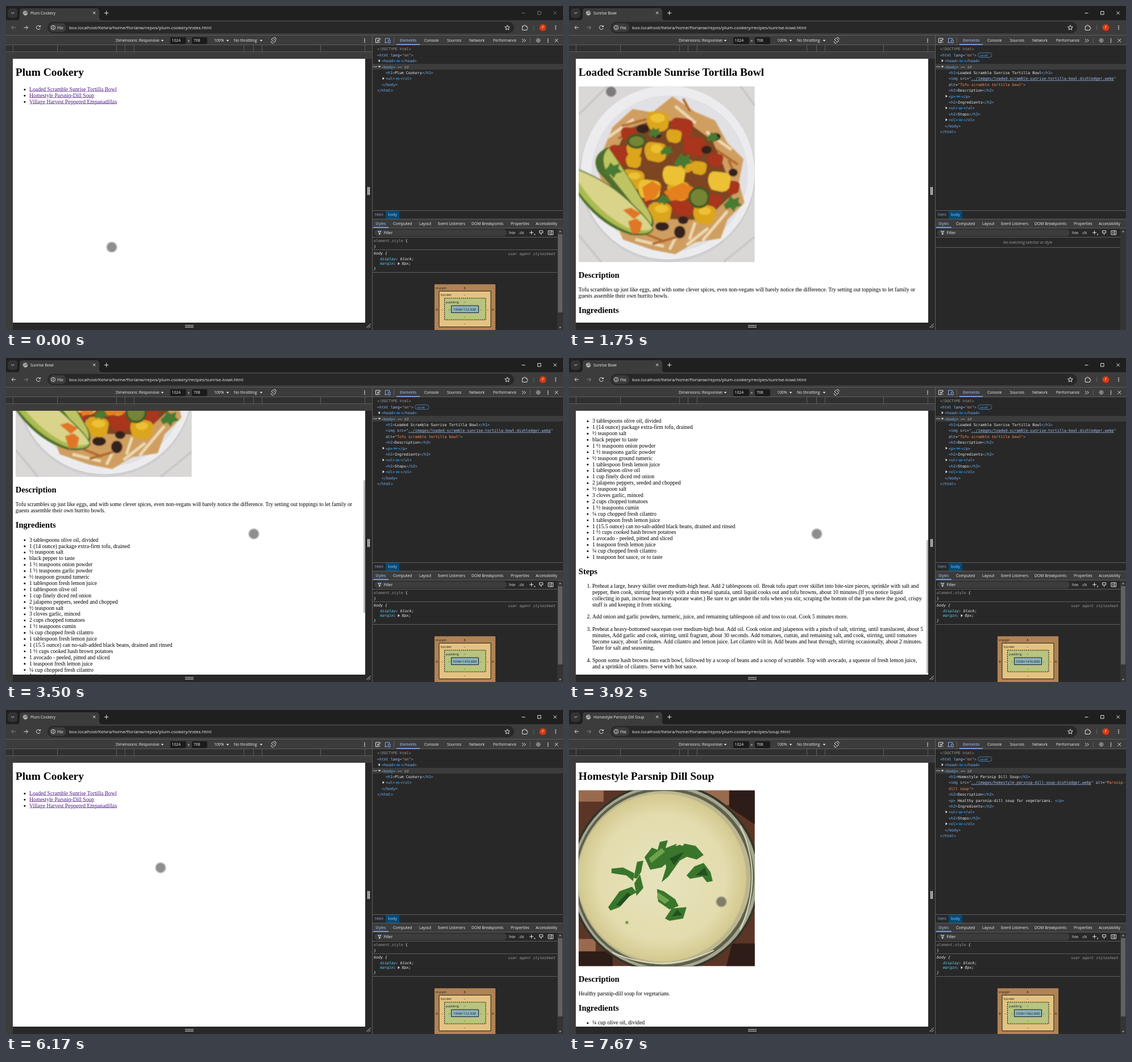
Animation, 980 px wide and 571 px high, one loop 8000 ms. Source, as an HTML page:

```html
<!DOCTYPE html>
<html lang="en">
<head>
<meta charset="utf-8">
<title>Recipe browser</title>
<style>
html, body { margin: 0; width: 100%; height: 100%; overflow: hidden; background: #282828; }
#stage { position: relative; width: 980px; height: 571px; overflow: hidden; }
#ui { position: absolute; left: 0; top: 0; font: 6.8px "Open Sans", "Noto Sans", sans-serif; fill: #efefef; }
#ui text { white-space: pre; }
.mono { font: 6.62px "DejaVu Sans Mono", "Noto Sans Mono", monospace; }
.line { fill: none; stroke: #e3e3e3; stroke-width: 1; }
.rule { fill: none; stroke: #5e5e5e; stroke-width: 1; }
.dim { opacity: .42; }
.url { font-size: 7.9px; }
.g { fill: #74b4fa; }
.n { fill: #a8c7fa; }
.v { fill: #fe8d59; }
.k { fill: #5cd5fb; }
.q { fill: #9b9b9b; }
.i { font-style: italic; }
.u { text-decoration: underline; }
.mid { text-anchor: middle; }
.box { font-size: 6px; fill: #222; }

#view { position: absolute; left: 12px; top: 93px; width: 620px; height: 465px; overflow: hidden; background: #fff; }
.roll { position: absolute; left: 0; top: 0; }
.doc { width: 1024px; padding: 0 8px; box-sizing: border-box; display: flow-root; transform: scale(.6055);
  transform-origin: 0 0; color: #000; font: 16px/18px "Liberation Serif", "Noto Serif", serif; }
.doc h1 { font-size: 32px; line-height: 37px; margin: 21.44px 0; }
.doc h2 { font-size: 24px; line-height: 27px; margin: 19.92px 0; }
.doc p, .doc ul, .doc ol { margin: 16px 0; }
.doc ul, .doc ol { padding-left: 40px; }
.doc ol li + li { margin-top: 18px; }
.doc a { color: #551a8b; text-decoration: underline; }
.pic { height: 516px; }
.pic svg { display: block; width: 512px; height: 512px; }
#thumb { position: absolute; left: 617px; top: 2px; width: 3px; height: 234px; border-radius: 1px; background: #b9b9b9; }
#dot { position: absolute; left: -10px; top: -10px; width: 16px; height: 16px; border-radius: 50%;
  border: 2px solid rgba(90, 90, 90, .34); background: rgba(40, 40, 40, .52); background-clip: padding-box; }

.a, .b, .c, .match, .none, .win { animation: a 8s step-end infinite; }
.b { animation-name: b; }
.c { animation-name: c; }
.match { animation-name: match; }
.none { animation-name: none-found; }
.win { animation-name: focus; }
#dot { animation: move 8s linear infinite; }
#bowl { animation: b 8s step-end infinite, scroll 8s linear infinite; }
#thumb { animation: thumb 8s linear infinite, fade 8s linear infinite; }

@keyframes a { 0% { visibility: visible } 20.85% { visibility: hidden } 66.6% { visibility: visible } 89.6%, 100% { visibility: hidden } }
@keyframes b { 0% { visibility: hidden } 20.85% { visibility: visible } 66.6%, 100% { visibility: hidden } }
@keyframes c { 0% { visibility: hidden } 89.6%, 100% { visibility: visible } }
@keyframes match { 0% { opacity: 1 } 20.85% { opacity: 0 } 24% { opacity: 1 } 66.6% { opacity: 0 } 69.7% { opacity: 1 } 89.6% { opacity: 0 } 92.7%, 100% { opacity: 1 } }
@keyframes none-found { 0% { opacity: 0 } 20.85% { opacity: 1 } 24% { opacity: 0 } 66.6% { opacity: 1 } 69.7% { opacity: 0 } 89.6% { opacity: 1 } 92.7%, 100% { opacity: 0 } }
@keyframes focus { 0% { opacity: .42 } 9.4%, 100% { opacity: 1 } }
@keyframes scroll {
  0%, 39.5% { transform: translateY(0) }
  39.625% { transform: translateY(-5.5px) }
  43.75% { transform: translateY(-241px) }
  46.9% { transform: translateY(-408px) }
  49%, 100% { transform: translateY(-451px) }
}
@keyframes thumb {
  0%, 39.5% { transform: translateY(0) }
  39.625% { transform: translateY(1px) }
  43.75% { transform: translateY(120px) }
  46.9% { transform: translateY(204px) }
  49%, 100% { transform: translateY(226px) }
}
@keyframes fade { 0%, 39.5% { opacity: 0 } 39.6%, 53% { opacity: 1 } 56%, 100% { opacity: 0 } }
@keyframes move {
  0%, .95% { transform: translate(186px, 425px) }
  1% { transform: translate(201px, 378px) }
  2.125%, 3.6% { transform: translate(218px, 326px); animation-timing-function: ease-in-out }
  13.5% { transform: translate(85px, 162px) }
  14.6%, 17.6% { transform: translate(79px, 154px) }
  18.75%, 23.9% { transform: translate(74px, 151px) }
  25% { transform: translate(42px, 186px) }
  26% { transform: translate(38px, 222px) }
  27.1% { transform: translate(80px, 275px) }
  28.1% { transform: translate(200px, 312px) }
  29.1% { transform: translate(345px, 314px) }
  30.25%, 39.7% { transform: translate(436px, 306px) }
  41%, 53% { transform: translate(436px, 310px); animation-timing-function: ease-in-out }
  62.5% { transform: translate(42px, 47px) }
  64.6%, 67.5% { transform: translate(13px, 38px); animation-timing-function: ease-in-out }
  72.9%, 73.9% { transform: translate(277px, 284px) }
  74%, 77% { transform: translate(277px, 280px) }
  77.125% { transform: translate(272px, 278px); animation-timing-function: ease-in-out }
  85.375%, 90.5% { transform: translate(119px, 163px); animation-timing-function: ease-in-out }
  95.8%, 100% { transform: translate(268px, 338px) }
}
</style>
</head>
<body>
<div id="stage">
<svg id="ui" width="980" height="571" viewBox="0 0 980 571">
  <defs>
    <path id="down" d="M-2.4-1.2h4.8L0 1.6z"/>
    <path id="right" d="M-1.4-2.4v4.8L1.8 0z"/>
    <g id="more"><rect width="8.4" height="5" rx="2.5" fill="#0b4a78"/><path d="M1.7 2.5h1M3.7 2.5h1M5.7 2.5h1" stroke="#a8c7fa"/></g>
    <g id="kebab"><circle cy="-2.8" r=".9"/><circle r=".9"/><circle cy="2.8" r=".9"/></g>
    <path id="arrow" class="line" d="M3.6 0h-7M-.4-3.2L-3.6 0l3.2 3.2"/>
  </defs>

  <!-- browser frame -->
  <path fill="#1f1f1f" d="M0 0h980v26H0z"/>
  <path fill="#3c3c3c" d="M0 25h980v27H0zM19 25q5 0 5-5V9q0-5 5-5h130q5 0 5 5v11q0 5 5 5z"/>
  <rect x="3" y="4" width="17" height="17" rx="5" fill="#333"/>
  <path class="line" d="M9.3 11l2.5 2.5 2.5-2.5M153 10l4.400 4.400M157.400 10L153 14.400M173 12.300h7.400M176.700 8.600V16"/>
  <circle cx="34" cy="12.400" r="4.200" fill="#c7c7c7"/>
  <path d="M31 11q3-3 4 0t-2 2-1 2M35 9q2 1 2.500 3l-2 2" fill="none" stroke="#4a4a4a"/>
  <text class="a" x="43" y="15">Plum Cookery</text>
  <text class="b" x="43" y="15">Sunrise Bowl</text>
  <text class="c" x="43" y="15">Homestyle Parsnip Dill Soup</text>
  <path class="line win" d="M907.500 12.500h6M935.500 9.500h5.500v5.500h-5.500zM963.300 9.500l5.500 5.500M968.800 9.500l-5.500 5.500"/>
  <g class="a"><use href="#arrow" class="dim" x="13.500" y="38"/><use href="#arrow" transform="translate(35 38) scale(-1 1)"/></g>
  <g class="b"><use href="#arrow" x="13.500" y="38"/><use href="#arrow" class="dim" transform="translate(35 38) scale(-1 1)"/></g>
  <g class="c"><use href="#arrow" x="13.500" y="38"/><use href="#arrow" class="dim" transform="translate(35 38) scale(-1 1)"/></g>
  <path class="line" d="M60 36.200a3.500 3.500 0 1 0 .3 2.800M60.400 34v2.600h-2.600"/>
  <rect x="73" y="28" width="821" height="20" rx="10" fill="#282828"/>
  <rect x="76" y="30.500" width="30" height="15" rx="7.500" fill="#3c3c3c"/>
  <circle class="line" cx="83" cy="38" r="3.600"/><path class="line" d="M83 37.500v2.500M83 35.600v1"/>
  <text x="90" y="40.500">File</text>
  <g class="url">
    <text class="a" x="111" y="41">box.localhost/Kelvra/home/florianw/repos/plum-cookery/index.html</text>
    <text class="b" x="111" y="41">box.localhost/Kelvra/home/florianw/repos/plum-cookery/recipes/sunrise-bowl.html</text>
    <text class="c" x="111" y="41">box.localhost/Kelvra/home/florianw/repos/plum-cookery/recipes/soup.html</text>
  </g>
  <path class="line" d="M882 33.800l1.200 2.900 3.100.2-2.400 2 .8 3.100-2.700-1.700-2.700 1.700.8-3.100-2.400-2 3.100-.2z"/>
  <path class="line" d="M908.500 35.500h2.500q0-2 1.500-2t1.500 2h2.500v2.500q1.500 0 1.500 1.200T916.500 41v1.500h-8z"/>
  <path class="rule" d="M928.500 33.500v9"/>
  <circle cx="944.500" cy="38" r="6" fill="#d93a12"/><text class="mid" x="944.500" y="40.300" font-size="6.200">F</text>
  <use href="#kebab" x="967" y="38"/>

  <!-- device mode -->
  <path fill="#3c3c3c" d="M0 52h980v17H0zM0 69h645v502H0z"/>
  <path fill="#303030" d="M0 69h644v11H0z"/>
  <path fill="#282828" d="M632 93h12v478h-12zM12 558h620v13H12z"/>
  <path class="rule" d="M0 51.500h980M0 68.500h980M0 80.500h644M12.500 69v11M90.500 69v11M194.500 69v11M209.500 69v11M225.500 69v11M418.500 69v11M435.500 69v11M450.500 69v11M553.500 69v11M631.500 69v11"/>
  <text x="193" y="63.300">Dimensions: Responsive</text><use href="#down" x="275" y="61"/>
  <rect x="289" y="55" width="28" height="12" rx="2" fill="#1b1b1b"/><text x="291.500" y="63.300">1024</text>
  <text x="319.500" y="63.500">×</text>
  <rect x="327" y="55" width="27" height="12" rx="2" fill="#1b1b1b"/><text x="330" y="63.300">768</text>
  <text x="366" y="63.300">100%</text><use href="#down" x="390" y="61"/>
  <text x="401" y="63.300">No throttling</text><use href="#down" x="449" y="61"/>
  <path class="line" d="M467 59l2.700-2.700 5 5-2.700 2.700zM466 62q.5 4 4.500 4M475.500 59q-.5-3.500-4-4"/>
  <use href="#kebab" x="631" y="61"/>
  <path class="line" d="M315 563h15M315 566h15M634.500 567l7-7M638 567.500l3.500-3.500"/>
  <path class="line" style="stroke-width:1.500" d="M636.700 319v14M639.300 319v14"/>

  <!-- developer panel -->
  <path fill="#282828" d="M645 69h335v502H645z"/>
  <path class="rule" d="M644.500 52v519"/>
  <path class="line" d="M656 64.500h-5.500v-7.500h7.500v3M654 60l4.500 4.500M654 63.500V60h3.500"/>
  <path class="line" style="stroke:#7cacf8" d="M667.500 64v-7h7v2M666 64.500h5M672.500 60h3.500v5h-3.500z"/>
  <path class="rule" d="M682.500 56v10"/>
  <text x="693" y="63.300" fill="#a8c7fa">Elements</text><path fill="#7cacf8" d="M687 67h41v1.500h-41z"/>
  <text x="736" y="63.300">Console</text><text x="776" y="63.300">Sources</text>
  <text x="815" y="63.300">Network</text><text x="857" y="63.300">Performance</text>
  <path class="line" d="M908 58l2.800 2.800-2.800 2.800M911.500 58l2.800 2.800-2.800 2.800M965.500 57.800l5.800 5.800M971.300 57.800l-5.800 5.800"/>
  <path class="rule" d="M922.500 56v10"/>
  <circle class="line" cx="936.500" cy="60.700" r="3.400" stroke-dasharray="1.800 .8"/><circle class="line" cx="936.500" cy="60.700" r="1.600"/>
  <use href="#kebab" x="953.500" y="61"/>

  <path fill="#3c3c3c" d="M645 102h335v10H645z"/>
  <g id="tree" class="mono"></g>

  <path fill="#004a77" d="M668 361h24v14h-24z"/>
  <text x="649" y="370" fill="#7cacf8">html</text><text x="672" y="370" fill="#a8c7fa">body</text>
  <path fill="#3c3c3c" d="M645 375h335v16H645z"/>
  <text x="650" y="385.700" fill="#a8c7fa">Styles</text><path fill="#7cacf8" d="M646 389.500h27v1.500h-27z"/>
  <text x="681" y="385.700">Computed</text><text x="727" y="385.700">Layout</text>
  <text x="760" y="385.700">Event Listeners</text><text x="819" y="385.700">DOM Breakpoints</text>
  <text x="888" y="385.700">Properties</text><text x="932" y="385.700">Accessibility</text>
  <path class="rule" d="M645 360.500h335M645 375.500h335M645 391.500h335M645 407.500h325"/>
  <rect x="648" y="393.500" width="233" height="12" rx="6" fill="#3c3c3c"/>
  <path class="line" d="M654.500 397h5.500l-2 2.500v3h-1.500v-3z"/><text x="664.500" y="402">Filter</text>
  <text x="884" y="401.500" font-size="6.200">:hov</text><text x="902" y="401.500" font-size="6.200">.cls</text>
  <path class="line" d="M921 399.300h7M924.500 395.800v7M938.500 396h6v4h-6zM941.500 400v3.500M954 396h8.500v7H954zM959.500 396v7M958 397.800l-2 1.700 2 1.700"/>
  <path d="M931 401v2.500h-2.500z"/>
  <path fill="#343434" d="M970 392h10v179h-10z"/>
  <path fill="#999" d="M972.800 398.500h4.400l-2.200-3z"/>

  <g class="none">
    <text class="i mid q" x="807" y="419.300">No matching selector or style</text>
    <path class="rule" d="M645 425.500h325"/>
  </g>
  <g class="match">
    <path fill="#616161" d="M971 402h8v138h-8z"/><path fill="#999" d="M972.800 565.500h4.400l-2.200 3z"/>
    <path class="rule" d="M645 429.500h325M645 469.500h325"/>
    <g class="mono">
      <text x="647" y="415.700"><tspan class="q">element.style</tspan> {</text><text x="647" y="425.500">}</text>
      <g class="i">
        <text x="647" y="438.300">body {</text>
        <text x="658" y="447.500"><tspan class="k">display</tspan>: block;</text>
        <text x="658" y="456.300"><tspan class="k">margin</tspan>:</text><text x="696.500" y="456.300">8px;</text>
        <text x="647" y="464.800">}</text>
        <text class="q" x="967" y="439.300" text-anchor="end">user agent stylesheet</text>
      </g>
      <use href="#right" x="691" y="454"/>
    </g>
    <g stroke="#1d1d1d" stroke-width="1">
      <path fill="#b08354" stroke-dasharray="2.400 1.200" d="M753.500 490h108v90h-108z"/>
      <path fill="#e3c381" d="M762 502.500h91v63h-91z"/>
      <path fill="#b8c480" stroke-dasharray="2.400 1.200" d="M771.500 515h72.500v38h-72.500z"/>
      <path fill="#88b2bd" d="M783.500 528h48v12.500h-48z"/>
    </g>
    <g class="box">
      <text x="756" y="498.500">margin</text><text x="765" y="511">border</text><text x="774" y="523.800">padding</text>
      <g class="mid">
        <text x="807" y="498.500">8</text><text x="807" y="511">–</text><text x="807" y="523.800">–</text>
        <text x="807" y="549.500">–</text><text x="807" y="562.200">–</text><text x="807" y="575">8</text>
        <text x="758" y="536.800">8</text><text x="767.500" y="536.800">–</text><text x="779.500" y="536.800">–</text>
        <text x="835.500" y="536.800">–</text><text x="847.500" y="536.800">–</text><text x="856.500" y="536.800">8</text>
        <text class="a" x="807" y="536.800">1008×112.438</text>
        <text class="b" x="807" y="536.800">1008×1476.880</text>
        <text class="c" x="807" y="536.800">1008×1062.880</text>
      </g>
    </g>
  </g>
</svg>

<div id="view">
  <div class="roll a"><div class="doc">
    <h1>Plum Cookery</h1>
    <ul>
      <li><a>Loaded Scramble Sunrise Tortilla Bowl</a></li>
      <li><a>Homestyle Parsnip-Dill Soup</a></li>
      <li><a>Village Harvest Peppered Empanadillas</a></li>
    </ul>
  </div></div>

  <div class="roll" id="bowl"><div class="doc">
    <h1>Loaded Scramble Sunrise Tortilla Bowl</h1>
    <div class="pic"><svg viewBox="0 0 310 310">
      <defs>
        <path id="cube" d="M-20-6Q-18-18-9-18L8-16Q20-14 20-5L17 11Q12 18 3 18L-14 14Q-21 4-20-6z"/>
        <use id="chip" href="#cube" transform="scale(.68)"/>
        <path id="leaf" d="M-16 2L-8-6-4-14 2-8 12-12 10-3 17 3 6 6 2 14-4 7-12 10z"/>
        <use id="sprig" href="#leaf" transform="scale(.7)"/>
        <filter id="soft"><feGaussianBlur stdDeviation="1.300"/></filter>
      </defs>
      <path fill="#dad8d7" d="M0 0h310v310H0z"/>
      <path fill="none" stroke="#c4c2c2" stroke-width="3" filter="url(#soft)" d="M0 50L50 0M0 262l40 48M255 310l55-45M285 0l25 34"/>
      <circle cx="157" cy="155" r="155" fill="#cfcfd2"/>
      <circle cx="157" cy="152" r="153" fill="#ececee"/>
      <circle cx="160" cy="154" r="138" fill="#e1e1e5"/>
      <g filter="url(#soft)">
        <path fill="#cf9e60" d="M60 72L95 40 130 46 165 18 205 45 240 60 262 100 290 128 282 170 292 205 262 235 250 268 205 275 170 296 130 288 78 270 50 200 32 140z"/>
        <path fill="none" stroke="#ecd9b2" stroke-width="5" d="M52 90l45-32M170 35l36 30M225 80l44 32M262 220l-44 52M100 270l50 12M190 280l38-30M160 288l16-32M205 240l-10 30"/>
        <path fill="none" stroke="#b0682c" stroke-width="4" d="M76 70l44-12M242 112l38 26M130 278l42-12M184 22l12 22M70 92l22-10M264 130l10 24M112 258l40 16"/>
        <path fill="#7d4423" d="M84 76L130 60 190 62 235 95 255 140 272 190 222 236 160 234 120 205 68 165 64 120z"/>
        <g fill="#a8341e">
          <use href="#cube" x="182" y="73"/><use href="#cube" x="72" y="121"/><use href="#chip" x="88" y="84"/>
          <use href="#cube" x="204" y="106"/><use href="#chip" x="241" y="130"/><use href="#cube" x="184" y="212"/>
          <use href="#chip" x="270" y="178"/><use href="#chip" x="238" y="202"/><use href="#chip" x="112" y="205"/>
        </g>
        <g fill="#35201f">
          <ellipse cx="113" cy="75" rx="11" ry="8"/><ellipse cx="241" cy="89" rx="9" ry="7"/><ellipse cx="178" cy="257" rx="10" ry="11"/>
          <ellipse cx="147" cy="247" rx="12" ry="8"/><ellipse cx="225" cy="112" rx="9" ry="7"/><ellipse cx="184" cy="236" rx="9" ry="7"/>
          <ellipse cx="272" cy="152" rx="8" ry="7"/><ellipse cx="138" cy="86" rx="8" ry="6"/>
        </g>
        <g fill="#dba51d">
          <use href="#cube" x="140" y="62"/><use href="#chip" x="168" y="88"/><use href="#chip" x="97" y="132"/><use href="#chip" x="98" y="112"/>
          <use href="#cube" x="136" y="116"/><use href="#cube" x="96" y="164"/><use href="#cube" x="176" y="184"/>
          <use href="#cube" x="144" y="222"/><use href="#cube" x="222" y="226"/><use href="#chip" x="212" y="144"/><use href="#chip" x="188" y="140"/>
        </g>
        <g fill="#ecc136">
          <use href="#cube" x="248" y="168"/><use href="#cube" x="168" y="158"/><use href="#cube" x="125" y="182"/>
          <ellipse cx="139" cy="56" rx="13" ry="8"/><ellipse cx="137" cy="110" rx="10" ry="8"/><ellipse cx="146" cy="216" rx="12" ry="7"/>
          <ellipse cx="98" cy="158" rx="11" ry="6"/><ellipse cx="222" cy="220" rx="11" ry="7"/>
        </g>
        <path fill="#e5801d" d="M112 178l18-11 16 10-10 20-19 6zM150 186l32-16 20 8-12 20-28 4z"/>
        <g fill="#748436" stroke="#3f5722" stroke-width="4"><ellipse cx="102" cy="97" rx="15" ry="11"/><circle cx="212" cy="196" r="17"/></g>
        <g fill="#467a30">
          <use href="#leaf" x="184" y="132"/><use href="#leaf" x="271" y="207"/><use href="#sprig" x="150" y="200"/>
          <use href="#sprig" x="134" y="82"/><use href="#sprig" x="236" y="90"/><use href="#sprig" x="155" y="114"/>
        </g>
        <path fill="#4d6e2d" d="M52 107Q20 122 34 150L126 252Q140 242 122 216 88 156 52 107z"/>
        <path fill="#bfc463" d="M53 109Q38 122 48 148L126 246Q134 236 119 214 86 156 53 109z"/>
        <path fill="#4d6e2d" d="M0 146Q56 168 98 210 126 236 132 252 126 266 92 262 38 246 0 192z"/>
        <path fill="#d9d48a" d="M0 148Q56 170 97 212 124 237 130 251 112 259 84 250 34 228 0 174z"/>
        <path fill="#aabb50" d="M0 168Q34 222 84 248 112 258 130 251 124 263 93 258 40 240 0 186z"/>
        <use href="#leaf" x="60" y="148" fill="#467a30"/>
        <path fill="#df7726" d="M78 218l14-4 18 10-13 10zM87 238l15-5 10 8-4 17-14 2z"/>
      </g>
    </svg></div>
    <h2>Description</h2>
    <p>Tofu scrambles up just like eggs, and with some clever spices, even non-vegans will barely notice the difference. Try setting out toppings to let family or guests assemble their own burrito bowls.</p>
    <h2>Ingredients</h2>
    <ul>
      <li>3 tablespoons olive oil, divided</li>
      <li>1 (14 ounce) package extra-firm tofu, drained</li>
      <li>½ teaspoon salt</li>
      <li>black pepper to taste</li>
      <li>1 ½ teaspoons onion powder</li>
      <li>1 ½ teaspoons garlic powder</li>
      <li>½ teaspoon ground tumeric</li>
      <li>1 tablespoon fresh lemon juice</li>
      <li>1 tablespoon olive oil</li>
      <li>1 cup finely diced red onion</li>
      <li>2 jalapeno peppers, seeded and chopped</li>
      <li>½ teaspoon salt</li>
      <li>3 cloves garlic, minced</li>
      <li>2 cups chopped tomatoes</li>
      <li>1 ½ teaspoons cumin</li>
      <li>¼ cup chopped fresh cilantro</li>
      <li>1 tablespoon fresh lemon juice</li>
      <li>1 (15.5 ounce) can no-salt-added black beans, drained and rinsed</li>
      <li>1 ½ cups cooked hash brown potatoes</li>
      <li>1 avocado - peeled, pitted and sliced</li>
      <li>1 teaspoon fresh lemon juice</li>
      <li>¼ cup chopped fresh cilantro</li>
      <li>1 teaspoon hot sauce, or to taste</li>
    </ul>
    <h2>Steps</h2>
    <ol>
      <li>Preheat a large, heavy skillet over medium-high heat. Add 2 tablespoons oil. Break tofu apart over skillet into bite-size pieces, sprinkle with salt and pepper, then cook, stirring frequently with a thin metal spatula, until liquid cooks out and tofu browns, about 10 minutes.(If you notice liquid collecting in pan, increase heat to evaporate water.) Be sure to get under the tofu when you stir, scraping the bottom of the pan where the good, crispy stuff is and keeping it from sticking.</li>
      <li>Add onion and garlic powders, turmeric, juice, and remaining tablespoon oil and toss to coat. Cook 5 minutes more.</li>
      <li>Preheat a heavy-bottomed saucepan over medium-high heat. Add oil. Cook onion and jalapenos with a pinch of salt, stirring, until translucent, about 5 minutes, Add garlic and cook, stirring, until fragrant, about 30 seconds. Add tomatoes, cumin, and remaining salt, and cook, stirring, until tomatoes become saucy, about 5 minutes. Add cilantro and lemon juice. Let cilantro wilt in. Add beans and heat through, stirring occasionally, about 2 minutes. Taste for salt and seasoning.</li>
      <li>Spoon some hash browns into each bowl, followed by a scoop of beans and a scoop of scramble. Top with avocado, a squeeze of fresh lemon juice, and a sprinkle of cilantro. Serve with hot sauce.</li>
    </ol>
  </div></div>

  <div class="roll c"><div class="doc">
    <h1>Homestyle Parsnip Dill Soup</h1>
    <div class="pic"><svg viewBox="0 0 310 310">
      <defs><radialGradient id="cream"><stop offset="0" stop-color="#e6e3bd"/><stop offset=".75" stop-color="#e3dcae"/><stop offset="1" stop-color="#d3c98f"/></radialGradient></defs>
      <path fill="#5b3526" d="M0 0h310v310H0z"/>
      <path fill="#9a6a4e" d="M0 0h44v20H0zM215 0h50v26h-50zM0 262h30v22H0z"/>
      <path fill="#2d1c17" d="M265 0h45v60l-45-30zM270 270h40v40h-50zM0 284h60v26H0z"/>
      <circle cx="152" cy="154" r="167" fill="#33352b"/>
      <circle cx="152" cy="154" r="163" fill="#a5a68d"/>
      <circle cx="151" cy="154" r="158" fill="#5e604c"/>
      <circle cx="150" cy="154" r="153" fill="#bcb78e"/>
      <circle cx="147" cy="154" r="148" fill="url(#cream)"/>
      <path fill="none" stroke="#dedcc6" stroke-width="2" d="M284 62q43 90 0 184M60 286q90 40 178-4"/>
      <g fill="#39762c">
        <path d="M116 118l13-17 10 4 4-14 14-3-4 14 20-8-8 16 20-8-6 16-18 6-15 12-20 4z"/>
        <path d="M150 106l28-10 14 6 4 12-18 10-20 28-12 10 8-26z"/>
        <path d="M178 106l8-12 20 4 14 16-12 8-22-6z"/>
        <path d="M190 150l14-16 16-6 12 16 4 16-10 2-8-10-22 4z"/>
        <path d="M97 154l6-28 11-2-4 20-8 12zM58 138l20-2 20 10-2 14-12-10-26-4z"/>
        <path d="M52 206l20-28 22-8 8 10-18 10-12 16-16 6zM98 164l10-16 6 24-12 14z"/>
        <path d="M138 174l12 4 20 14 6 12-16 6-20-14zM152 226l12-18 26-2-6 20-24 4z"/>
      </g>
      <g fill="#6fa34b"><path d="M124 120l22-18 6 6-24 20zM140 180l20 14-8 6-14-10zM82 231l5-1 1 5-5 1z"/></g>
      <path fill="#23501f" d="M160 120l26-12-18 24zM66 202l20-22 6 4-18 20zM164 222l10-12 8 10zM206 150l16-14 6 14z"/>
    </svg></div>
    <h2>Description</h2>
    <p>Healthy parsnip-dill soup for vegetarians.</p>
    <h2>Ingredients</h2>
    <ul><li>¼ cup olive oil, divided</li></ul>
  </div></div>
  <div id="thumb"></div>
</div>
<div id="dot"></div>
</div>

<script>
const left = [653, 661, 668], cell = 3.985;
const row = i => 78.3 + i * 10.4;
const tag = n => `<tspan class="g">&lt;${n}&gt;</tspan>`;
const pair = (n, s) => tag(n) + s + tag('/' + n);
const text = (x, i, s) => `<text x="${x}" y="${row(i)}">${s}</text>`;
const line = (depth, i, s) => text(left[depth], i, s);
const arrow = (kind, depth, i) => `<use href="#${kind}" x="${left[depth] - 4}" y="${row(i) - 2.6}"/>`;
const fold = (depth, i, n) => {
  const x = left[depth] + (n.length + 2) * cell;
  return arrow('right', depth, i) + line(depth, i, tag(n)) +
    `<use href="#more" x="${x + .8}" y="${row(i) - 4.6}"/>` + text(x + 10, i, tag('/' + n));
};
const close = i => line(1, i, tag('/body')) + line(0, i + 1, tag('/html'));
const image = (path, alt, rest) =>
  line(2, 5, `<tspan class="g">&lt;img</tspan> <tspan class="n">src="<tspan class="u">../images/${path}</tspan>"</tspan>${alt}`) +
  line(2, 6, rest + '<tspan class="g">&gt;</tspan>');
const attr = '<tspan class="n">alt</tspan>=';
const val = s => `<tspan class="v">${s}</tspan>`;
const recipe = (title, img, about) =>
  `<rect x="719.500" y="82.500" width="24.500" height="8" rx="4" fill="none" stroke="#4c8fd0" stroke-width=".8"/>
   <text x="723" y="88.500" font-size="5.600" class="g" style="font-family:'Open Sans',sans-serif">scroll</text>` +
  line(2, 4, pair('h1', title)) + img + line(2, 7, pair('h2', 'Description')) + about +
  line(2, 9, pair('h2', 'Ingredients')) + fold(2, 10, 'ul') +
  line(2, 11, pair('h2', 'Steps')) + fold(2, 12, 'ol') + close(13);

document.getElementById('tree').innerHTML =
  line(0, 0, '<tspan class="q">&lt;!DOCTYPE html&gt;</tspan>') +
  line(0, 1, `<tspan class="g">&lt;html <tspan class="n">lang</tspan>="${val('en')}"&gt;</tspan>`) +
  fold(1, 2, 'head') + arrow('down', 1, 3) +
  line(1, 3, tag('body') + ' <tspan class="q i">== $0</tspan>') +
  '<path d="M646.500 107h1.400M649 107h1.400M651.500 107h1.400" stroke="#ccc" stroke-width="1.300"/>' +
  `<g class="a">${line(2, 4, pair('h1', 'Plum Cookery')) + fold(2, 5, 'ul') + close(6)}</g>` +
  `<g class="b">${recipe('Loaded Scramble Sunrise Tortilla Bowl',
    image('loaded-scramble-sunrise-tortilla-bowl-dishledger.webp', '', attr + val('"Tofu scramble tortilla bowl"')),
    fold(2, 8, 'p'))}</g>` +
  `<g class="c">${recipe('Homestyle Parsnip Dill Soup',
    image('homestyle-parsnip-dill-soup-dishledger.webp', ' ' + attr + val('"Parsnip-'), val('dill soup"')),
    line(2, 8, pair('p', ' Healthy parsnip-dill soup for vegetarians. ')))}</g>`;
</script>
</body>
</html>
```
